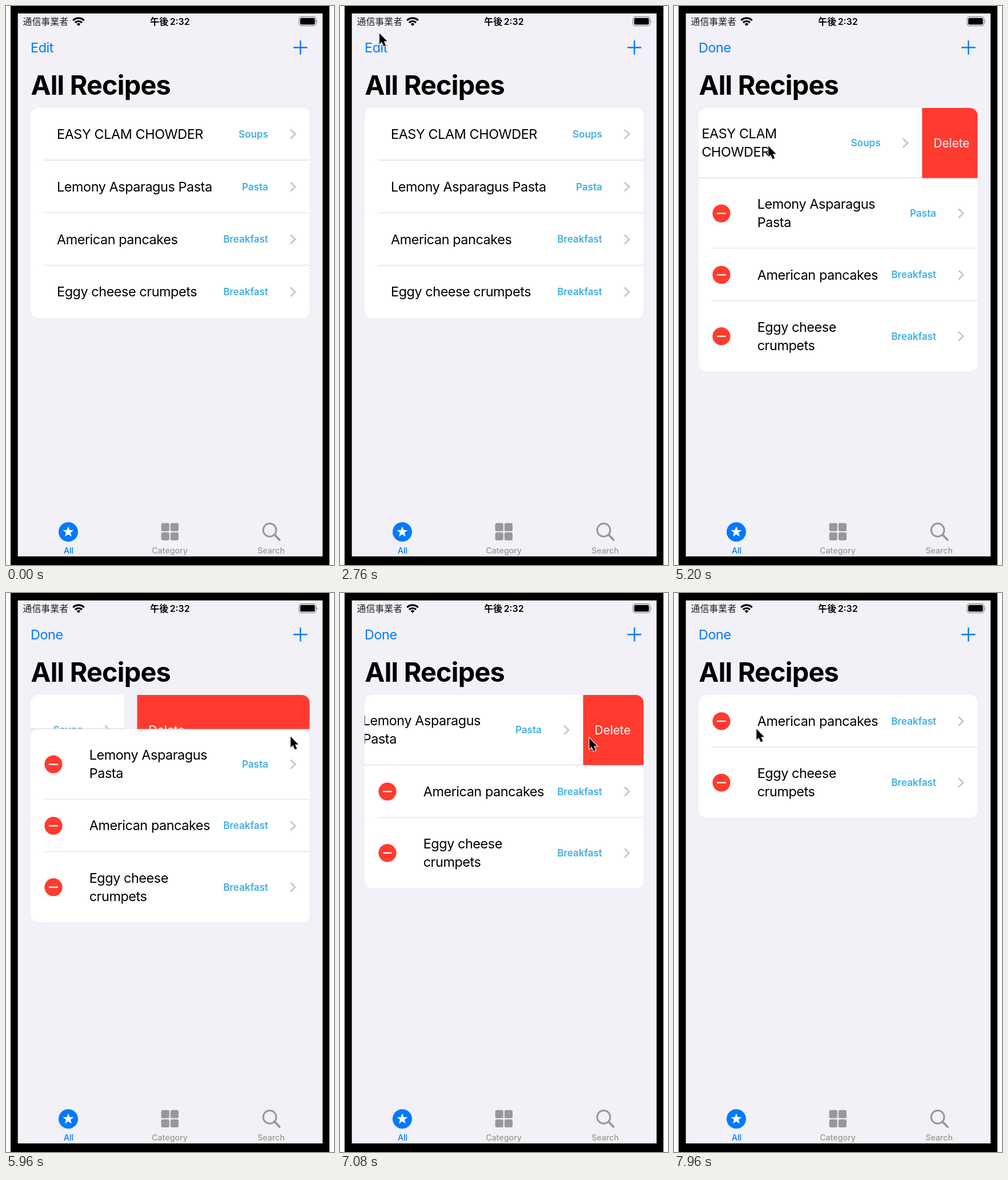
Recreate the animation shown at these times as an HTML page. Size 574 by 976 pixels, loop 8000 ms.

```html
<!DOCTYPE html>
<html lang="ja">
<head>
<meta charset="utf-8">
<title>Recipe list</title>
<style>
  html, body { margin: 0; width: 100%; height: 100%; overflow: hidden; background: #fff; }
  svg { display: block; width: 574px; height: 976px; font-family: Inter, "Noto Sans CJK JP", "Noto Sans CJK", sans-serif; }
  .body { font-size: 23.4px; letter-spacing: -.43px; }
  .blue { fill: #007aff; }
  .tag { font-size: 17px; font-weight: 600; fill: #41aee3; text-anchor: end; }
  .delete { font-size: 20.8px; fill: #fff; }
  .title { font-size: 46.8px; font-weight: 700; letter-spacing: -.8px; }
  .tab { font-size: 14.2px; font-weight: 500; text-anchor: middle; }
  .status { font-size: 15.9px; }
</style>
</head>
<body>
<svg viewBox="0 0 574 976">
  <path d="M8 0H566V976H8Z"/>
  <path d="M20.7 13H554V961H20.7Z" fill="#f2f1f7"/>

  <text class="status" x="29.6" y="33" fill="#222">通信事業者</text>
  <g fill="none" stroke="#000" stroke-width="3.2">
    <path d="M117.3 25.2a13.7 13.7 0 0 1 19.4 0M121 29a8.5 8.5 0 0 1 12 0"/>
    <path d="M127 35l-3.4-3.6a5 5 0 0 1 6.8 0Z" fill="#000" stroke="none"/>
  </g>
  <text class="status" x="287" y="33" font-weight="600" text-anchor="middle">午後<tspan dx="2.5">2:32</tspan></text>
  <rect x="512.8" y="19" width="29.8" height="15.6" rx="4" fill="none" stroke="#8e8e92" stroke-width="1.3"/>
  <rect x="514.8" y="21" width="25.8" height="11.6" rx="2.4"/>
  <path d="M544 24.5q2.4 2.3 0 4.8Z" fill="#8e8e92"/>

  <text id="edit" class="body blue" x="43" y="81">Edit</text>
  <text id="done" class="body blue" x="43" y="81">Done</text>
  <path d="M503 72.5h24.4M515.2 60.3v24.4" stroke="#007aff" stroke-width="2.4"/>
  <text class="title" x="43.5" y="155">All Recipes</text>

  <g id="list"></g>

  <g class="blue">
    <circle cx="109" cy="918.3" r="17"/>
    <path id="star" fill="#fff"/>
    <text class="tab" x="109.5" y="955.5">All</text>
  </g>
  <g fill="#98989b">
    <rect x="271.6" y="902.7" width="14.2" height="14.2" rx="3"/>
    <rect x="287.8" y="902.7" width="14.2" height="14.2" rx="3"/>
    <rect x="271.6" y="918.9" width="14.2" height="14.2" rx="3"/>
    <rect x="287.8" y="918.9" width="14.2" height="14.2" rx="3"/>
    <text class="tab" x="286.5" y="955.5">Category</text>
    <path d="M470 923l8.5 9" stroke="#98989b" stroke-width="4" stroke-linecap="round"/>
    <circle cx="461.5" cy="915" r="11.4" fill="none" stroke="#98989b" stroke-width="3"/>
    <text class="tab" x="464" y="955.5">Search</text>
  </g>

  <g id="cursor">
    <g transform="translate(1 2.5) scale(.9)">
      <path d="M1 2V23L5.6 19 9.4 27.4 13.4 25.7 9.7 17.5H16Z" opacity=".14"/>
      <path d="M0 0V21L4.6 17 8.4 25.4 12.4 23.7 8.7 15.5H15Z" stroke="#fff" stroke-width="2.4" paint-order="stroke"/>
    </g>
  </g>
</svg>
<script>
const LOOP = 8000, EDIT = 3860;
const LEFT = 43.3, RIGHT = 531.5, TOP = 177.9, RADIUS = 14;
const SHORT = 91.8, TALL = 122.8, LINE = 32, BUTTON = 106;

const recipes = [
  { lines: ['EASY CLAM', 'CHOWDER'], tag: 'Soups', open: 4980, remove: 5869 },
  { lines: ['Lemony Asparagus', 'Pasta'], tag: 'Pasta', open: 6670, remove: 7561 },
  { lines: ['American pancakes'], tag: 'Breakfast' },
  { lines: ['Eggy cheese', 'crumpets'], tag: 'Breakfast' },
];

// Pointer stops: time, x, y
const stops = [
  [2080, 495, 795], [2640, 70, 43], [2760, 68, 45], [2880, 64, 59], [3900, 64, 59],
  [4520, 96, 219], [4900, 90, 240], [5080, 90, 240], [5520, 490, 250], [5900, 497, 248],
  [6000, 497, 248], [6500, 92, 250], [6720, 90, 242], [7180, 482, 252], [7340, 480, 249],
  [7660, 480, 249], [8040, 101, 233],
];

const $ = id => document.getElementById(id);
const clamp = v => Math.min(1, Math.max(0, v));
const mix = (a, b, p) => a + (b - a) * p;
const smooth = p => p * p * (3 - 2 * p);

// Critically damped spring from 0 to 1
function spring(ms) {
  if (!(ms > 0)) return 0;
  const x = ms * 0.0187, p = 1 - (1 + x) * Math.exp(-x);
  return p > 0.992 ? 1 : p;
}

function panel(y, h, bottomRadius) {
  const r = Math.min(RADIUS, h), b = bottomRadius;
  return `M${LEFT} ${y + r}a${r} ${r} 0 0 1 ${r} ${-r}H${RIGHT - r}a${r} ${r} 0 0 1 ${r} ${r}
    V${y + h - b}a${b} ${b} 0 0 1 ${-b} ${b}H${LEFT + b}a${b} ${b} 0 0 1 ${-b} ${-b}Z`;
}

function clipped(id, path, content) {
  return `<clipPath id="${id}"><path d="${path}"/></clipPath><g clip-path="url(#${id})">${content}</g>`;
}

function drawRow(row, y, t, edit, last) {
  const { full, h, opened, removed } = row;
  const mid = y + full / 2;
  const shift = -BUTTON * opened - 426 * removed;
  const red = RIGHT - BUTTON * opened - 382 * removed;
  const lines = t < EDIT ? [row.lines.join(' ')] : row.lines;
  const first = mid + 8.1 - (lines.length - 1) * LINE / 2;
  const label = lines.map((s, i) =>
    `<text class="body" x="${mix(89, 145.7, edit)}" y="${first + i * LINE}">${s}</text>`).join('');
  const minus = edit && `<g transform="translate(${mix(26, 83, edit)} ${mid})" opacity="${edit}">
    <circle r="15.6" fill="#ff3b30"/><path d="M-8 0H8" stroke="#fff" stroke-width="2.2"/></g>`;
  const rule = last ? '' : `<path d="M67 ${y + h - .5}H${RIGHT}" stroke="#d3d3d6" stroke-width="1.2"/>`;
  const button = opened && `<path d="M${red} ${y}H${RIGHT}V${y + h}H${red}Z" fill="#ff3b30"/>
    <text class="delete" x="${red + 20}" y="${mid + 7.7}">Delete</text>`;
  return `<g transform="translate(${shift})">
    <path d="M${LEFT} ${y}H${RIGHT}V${y + h}H${LEFT}Z" fill="#fff"/>
    ${minus || ''}${label}
    <text class="tag" x="458.8" y="${mid + 6}">${row.tag}</text>
    <path d="M498 ${mid - 7.8}l8 7.8l-8 7.8" fill="none" stroke="#c4c4c7" stroke-width="2.6"/>
    ${rule}</g>${button || ''}`;
}

function drawList(t) {
  const edit = spring(t - EDIT);
  const rows = recipes.map(r => {
    const full = r.lines.length > 1 ? mix(SHORT, TALL, edit) : SHORT;
    const removed = spring(t - r.remove);
    return { ...r, full, removed, opened: spring(t - r.open), h: full * (1 - removed) };
  }).filter(r => r.removed < 1);

  let y = TOP, out = '';
  if (rows[0].removed) {
    const gone = rows.shift();
    out = clipped('gone', panel(y, gone.h, 0), drawRow(gone, y, t, edit));
    y += gone.h;
  }
  const start = y;
  let card = '';
  rows.forEach((r, i) => {
    card += drawRow(r, y, t, edit, i === rows.length - 1);
    y += r.h;
  });
  return out + clipped('card', panel(start, y - start, RADIUS), card);
}

function pointer(t) {
  const i = stops.findIndex(s => s[0] > t);
  const [t0, x0, y0] = stops[i - 1], [t1, x1, y1] = stops[i];
  const p = smooth((t - t0) / (t1 - t0));
  return `translate(${mix(x0, x1, p)} ${mix(y0, y1, p)})`;
}

function draw(t) {
  const swap = clamp((t - EDIT) / 120);
  $('edit').setAttribute('opacity', 1 - swap);
  $('done').setAttribute('opacity', swap);
  $('list').innerHTML = drawList(t);
  const shown = t >= stops[0][0];
  $('cursor').setAttribute('visibility', shown ? 'visible' : 'hidden');
  if (shown) $('cursor').setAttribute('transform', pointer(t));
}

$('star').setAttribute('d', 'M' + Array.from({ length: 10 }, (_, i) => {
  const r = i % 2 ? 4.1 : 10, a = i * Math.PI / 5;
  return `${109 + r * Math.sin(a)} ${918.3 - r * Math.cos(a)}`;
}).join('L') + 'Z');

const began = performance.now();
function tick() {
  draw((performance.now() - began) % LOOP);
  requestAnimationFrame(tick);
}
tick();
</script>
</body>
</html>
```
